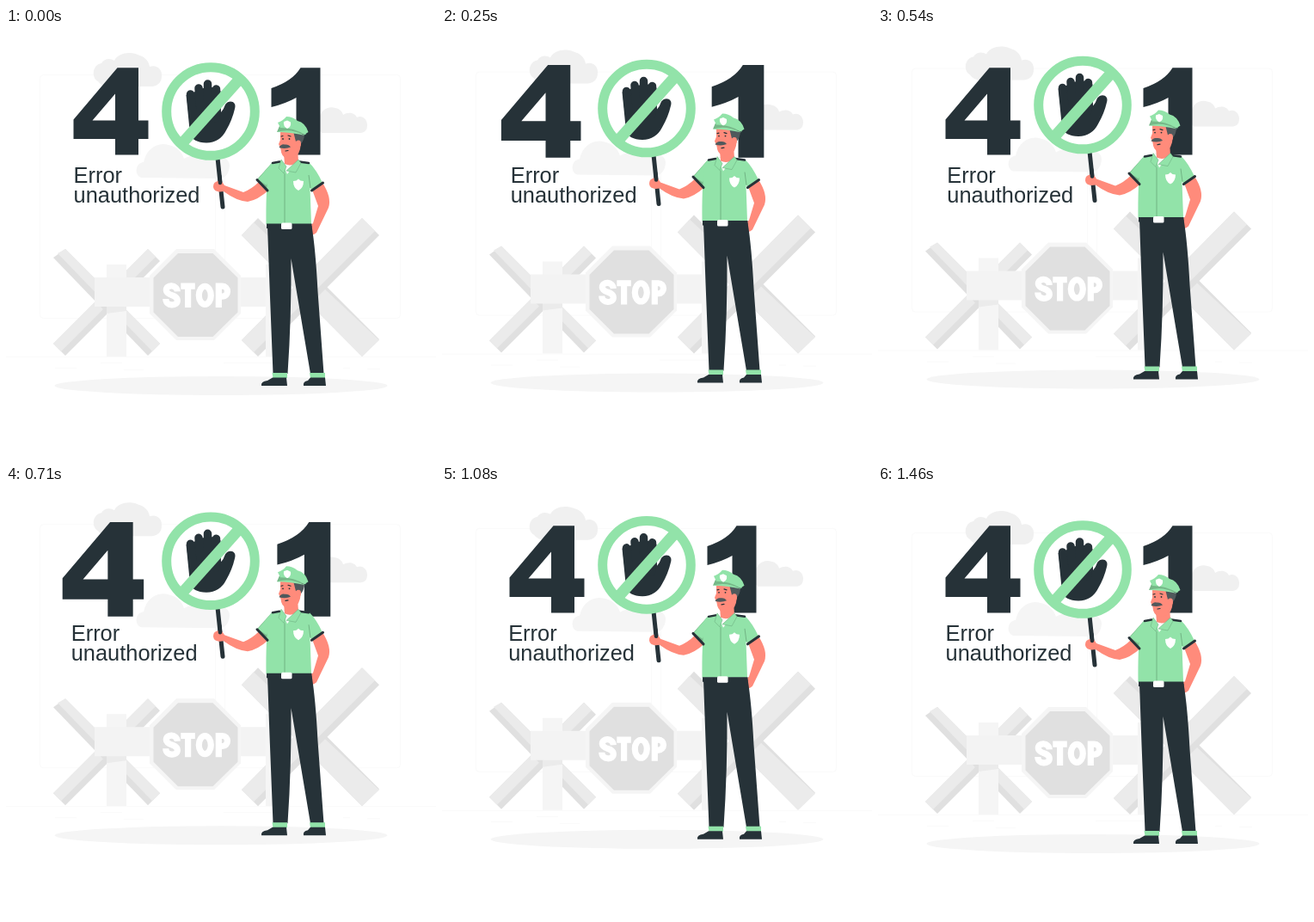
An HTML page that plays this animation: 500x500 px, repeating every 1.5 s.

```html
<!DOCTYPE html>
<html lang="en">
<head>
<meta charset="utf-8">
<title>401 Error unauthorized</title>
<style>
  html, body { margin: 0; width: 100%; height: 100%; overflow: hidden; background: #fff; }
  svg { display: block; width: 100%; height: 100%; }
  .dark { fill: #263238; }
  .green { fill: #92e3a9; }
  .skin { fill: #ff8b7b; }
  .white { fill: #fff; }
  .pale { fill: #f5f5f5; }
  .light { fill: #ebebeb; }
  .mid { fill: #e0e0e0; }
  .line { fill: none; stroke: #263238; stroke-linecap: round; stroke-linejoin: round; }
  .shade { fill: #76b888; }
  text { font: 25.4px Arial, "Liberation Sans", sans-serif; }
</style>
</head>
<body>
<svg viewBox="0 0 500 500">
  <g class="bob">
    <g fill="none" stroke="#fafafa">
      <rect x="39.500" y="54.500" width="204" height="283" rx="4"/>
      <rect x="254.500" y="54.500" width="204" height="283" rx="4"/>
      <path d="M0 382.500H500M57 395.500H82M110 389.500H135M137 397.500H160M253 389.500H312M392 395.500H400M420 396.500H435"/>
    </g>
    <g fill="#f0f0f0">
      <path d="M107 62C99 58 100 43 111 41C114 35 122 35 126 38C130 29 144 27 153 31C161 33 166 38 167 45C175 42 182 48 181 56C181 63 177 67 170 68H120Q111 68 107 62Z"/>
      <path d="M367 122Q360 116 364 105C366 96 374 90 383 93C388 94 391 97 392 101C398 97 406 99 408 104C414 101 420 106 420 113Q420 121 413 122Z"/>
    </g>
    <path class="pale" d="M157 174C149 171 150 157 160 156C163 141 176 132 189 136C199 138 205 145 207 152C218 145 229 148 234 154C244 147 260 149 260 160Q259 174 248 175Z"/>
    <ellipse class="pale" cx="250" cy="416" rx="193.500" ry="11"/>

    <path class="mid" d="M165 257L179 271L69 381L55 367Z"/>
    <path class="light" d="M165 257L174 266L64 376L55 367Z"/>
    <path class="mid" d="M69 257L179 367L165 381L55 267Z"/>
    <path class="light" d="M69 257L179 367L170 376L60 262Z"/>
    <path class="mid" d="M293 221L434 362L414 382L274 241Z"/>
    <path class="light" d="M288 226L434 363L414 382L274 241Z"/>
    <path class="mid" d="M414 221L434 241L293 382L274 363Z"/>
    <path class="light" d="M414 221L429 236L288 377L274 363Z"/>

    <path class="pale" d="M117 275H140V382H117ZM302 275H327V382H302Z"/>
    <path class="light" d="M117 323H140V329L117 332Z"/>
    <path fill="#f3f3f3" d="M103 290H302V324H103Z"/>
    <path class="pale" d="M198 257H242L273 288V332L242 363H198L167 332V288Z"/>
    <path class="mid" d="M200 262H240.500L269.500 290.500V330.500L240.500 359H200L171.500 330.500V290.500Z"/>
    <g fill="none" stroke="#fff" stroke-width="7.200" transform="translate(.8 .4)">
      <path d="M198.500 306C198 297.500 185.500 297.500 185.500 304.500C186 311.500 198.500 309 198.500 316.500C198.500 323.500 185 323.500 185 314.500"/>
      <path d="M202.500 299.800H219M210.800 299V324.500"/>
      <ellipse cx="230.500" cy="310.500" rx="7" ry="10.500"/>
      <path d="M246.500 324.500V299.800H251A5.500 5.800 0 0 1 251 311.800H247"/>
    </g>
  </g>

  <g id="digits" class="dark">
    <path fill-rule="evenodd" d="M129.500 46.300H154V107.500H165.500V129H154V147.500H127V129H78.500V106.500ZM127 76.500L100.500 107.500H127Z"/>
    <path d="M342.500 46.300H365.500V147.500H337.500V81Q325 88 308.500 92V70Q333 62 342.500 46.300Z"/>
  </g>
  <g id="message" class="dark">
    <text x="78.600" y="179.700">Error</text>
    <text x="78.600" y="202.500">unauthorized</text>
  </g>

  <g class="bob">
    <path class="line" stroke-width="5" d="M246 151L252 208"/>
    <circle class="white" cx="238" cy="97" r="55"/>
    <path class="dark" d="M209.500 78L220 74L229 70L240 69L249.500 73L250 98Q253 95 255 89C259 83 269 85 266 94Q263 107 256 119Q249 133 233 133.500Q217 133 214 123Z"/>
    <path class="line" stroke-width="9.500" d="M214.500 77L218 108M224 70L227 105M234.500 65L235 105M244.500 71L243.500 105"/>
    <g fill="none" stroke="#92e3a9">
      <circle stroke-width="11" cx="238" cy="97" r="51.300"/>
      <path stroke-width="13" d="M271.500 59.500L204.500 134.500"/>
    </g>

    <path class="skin" d="M244 179Q250 175 254 183L276 191Q286 187 294 179L306 188Q293 200 281 202Q268 201 253 190Q242 192 241 185Q241 180 244 179Z"/>
    <path class="line" stroke-width="4.500" d="M248.300 172L249 180"/>
    <path class="skin" d="M356 188L368 180Q379 197 375 209L361 238Q355 243 351 238Q350 231 357 227L363 207Z"/>

    <path class="dark" d="M304 230H355.500Q360 258 362.500 306L369.500 402H354Q341 325 331.500 268Q332 336 327.500 402H310.500L306.500 300Z"/>
    <path class="green" d="M309.500 401H327V407H310.500ZM353 401H371V407H354Z"/>
    <path class="dark" d="M310 406.500H326L327 416H297Q296 411 304 410ZM354 406.500H371L372 416H346Q345 411 351 410Z"/>

    <path class="shade" d="M309 157L292 176L304 189L312 178Z"/>
    <path class="green" d="M309 157L293 176L303 183L308 170Z"/>
    <path class="green" d="M309 157Q330 150 353 157Q361 165 368 180L356 189L353.500 186L355 228H302.500Q302 190 305 168Z"/>
    <path class="line" stroke-width="3" stroke-linecap="butt" d="M292 176.500L304 189M355.500 189L368.500 180"/>
    <path class="line" stroke-width="2.500" d="M310 157L318 155.500M341 155.500L352 157"/>
    <path fill="none" stroke="#69a77a" stroke-width=".8" d="M324 169V227M354 186L352 171"/>
    <path class="dark" d="M303 227.500H355.500V233H303Z"/>
    <rect class="white" x="320" y="226.500" width="12.500" height="7.500" rx="1.500"/>
    <path class="white" d="M334 178Q338 178 340 175.500Q342 178 346 178Q346 186 340 189Q334 186 334 178Z"/>

    <path class="white" d="M320 154H339L327 170Z"/>
    <path class="skin" d="M323 146L339 140L340 155Q332 162 324 158Z"/>
    <path d="M320 153L317 163L323 169L326 161ZM340 153L326 166L337 168L343 157Z" fill="#92e3a9" stroke="#69a77a" stroke-width=".5"/>
    <path class="skin" d="M319 119H341Q345 137 340 146Q333 154 326 151.500Q320 149 319.500 141L317 135L319 130Z"/>
    <path fill="#50595c" d="M334 120L347 123Q347 131 342 136L339 131L337 132Z"/>
    <ellipse class="skin" cx="340" cy="134.500" rx="3" ry="4"/>
    <path fill="#50595c" d="M317.500 139Q320 134.500 324 135.500Q329 135 331 138.500Q325 141 317.500 139Z"/>
    <path class="line" stroke-width="1.200" d="M320 126L322 125.500M328 125L331 126M325 143L328 142.500"/>
    <circle class="dark" cx="322" cy="129" r=".9"/>
    <circle class="dark" cx="329.500" cy="129" r=".9"/>
    <path class="shade" d="M318 114L346 117L349 124Q332 119 315 121Z"/>
    <path class="green" d="M316 110Q322 108 326 103Q333 103 339 108Q348 110 351.500 121L347 124Q335 116 319 116Z"/>
    <path class="green" d="M315 121Q330 116 348 125Q330 121 315 121Z"/>
    <path class="white" d="M323 109L327 107.500L331 109.500Q332 115 327 117Q322 114 323 109Z"/>
  </g>
</svg>
<script>
const LOOP = 1500, FRAMES = 36;
const bobbing = document.querySelectorAll(".bob");
const digits = document.getElementById("digits");
const message = document.getElementById("message");

// Linear keyframes as [percent, value] pairs
const FLOAT = [[0, 0], [50, -10], [100, 0]];
const BEAT = [[0, 1], [10, 1.1], [30, 1], [40, 1], [50, 1.1], [60, 1], [100, 1]];
const SHAKE = [[0, 0], [10, -1], [20, 2], [30, -4], [40, 4], [50, -4],
               [60, 4], [70, -4], [80, 2], [90, -1], [100, 0]];

function valueAt(keys, p) {
  const i = Math.max(1, keys.findIndex(key => key[0] >= p));
  const [p0, v0] = keys[i - 1], [p1, v1] = keys[i];
  return v0 + (v1 - v0) * (p - p0) / (p1 - p0);
}

function draw(now) {
  // The motion advances in 24 fps steps
  const step = Math.floor(now % LOOP / LOOP * FRAMES + 0.1) % FRAMES;
  const p = 100 * step / (FRAMES - 1);
  const y = valueAt(FLOAT, p);
  for (const group of bobbing) group.setAttribute("transform", `translate(0 ${y})`);
  digits.setAttribute("transform", `translate(228 97) scale(${valueAt(BEAT, p)}) translate(-228 -97)`);
  message.setAttribute("transform", `translate(${valueAt(SHAKE, p)} 0)`);
}

const start = performance.now();
function tick() {
  draw(performance.now() - start);
  requestAnimationFrame(tick);
}
tick();
</script>
</body>
</html>
```
